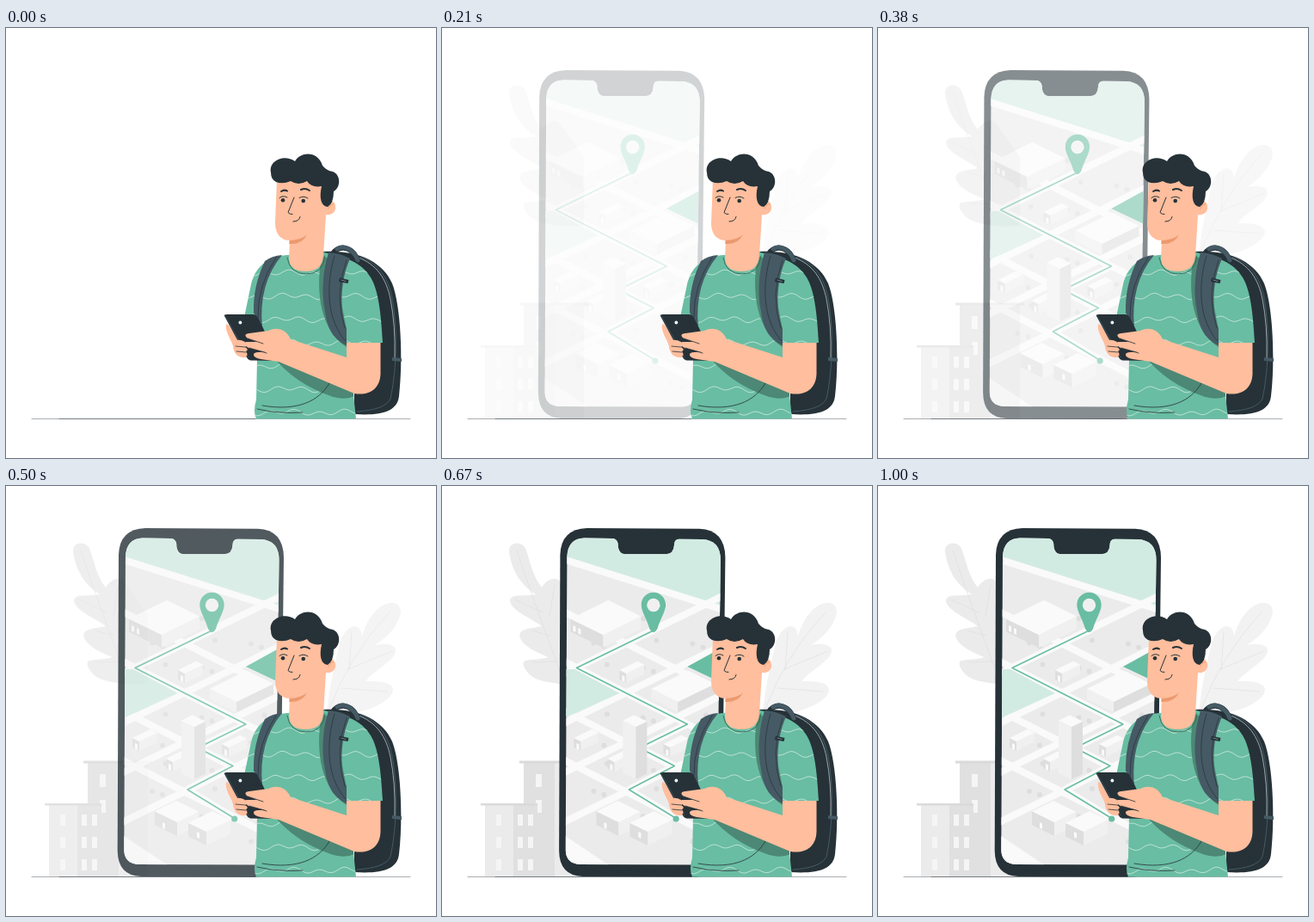
Animation, 500 px wide and 500 px high, one loop 1.04 s. Source, as an HTML page:

```html
<!DOCTYPE html>
<html lang="en">
<head>
<meta charset="utf-8">
<title>Traveller with map</title>
<style>
  html, body { margin: 0; width: 100%; height: 100%; overflow: hidden; background: #fff; }
  svg { display: block; width: 100vw; height: 100vh; }
  .line { fill: none; stroke-linecap: round; stroke-linejoin: round; }
  .ink { stroke: #263238; }
</style>
</head>
<body>
<svg viewBox="0 0 500 500">
  <defs>
    <clipPath id="screenClip">
      <path d="M165 60.500L198 61Q203 61.500 204.200 67Q204 79 213 79.300H260Q269 79 269.500 69Q269.500 62 275 61.700L302 62Q323.500 63 323.500 86L319 425Q318 440.500 302 440.500L160 440Q143.500 439 143.300 423L145 82Q146 61 165 60.500Z"/>
    </clipPath>
    <clipPath id="shirtClip"><use href="#shirt"/></clipPath>
  </defs>

  <g id="scenery" opacity="0">
    <path fill="#ebebeb" d="M78 77C77 64 94 63 98 75C103 90 106 106 116 118C122 108 133 104 138 112L165 150V230C142 232 122 229 109 224C97 218 91 205 97 203C104 201 117 202 123 199C112 194 95 187 91 177C87 165 104 166 116 163C104 154 81 145 79 134C79 124 97 129 109 126C91 114 82 100 78 77Z"/>
    <path class="line" stroke="#e0e0e0" stroke-width=".8" d="M87 75Q107 135 141 226M126 174L104 168M117 147L85 132M125 151L131 115M134 204L105 205"/>
    <path fill="#f2f2f2" d="M372 270C376 235 381 211 388 183C393 164 411 154 414 174C420 156 430 139 446 136C457 134 462 144 457 154C451 169 440 178 429 185C441 182 454 184 453 192C452 203 430 213 418 227C432 227 449 227 450 237C449 248 430 259 405 264Z"/>
    <path class="line" stroke="#e3e3e3" stroke-width=".8" d="M373 268Q397 199 446 147M399 214L402 169M398 213L449 192M390 235L443 239"/>
    <g id="buildings"></g>
  </g>

  <path class="line ink" stroke-width=".4" d="M30 454.500H470M62 454.500H290"/>

  <g id="phone" opacity="0">
    <path fill="#263238" d="M168 49L299 49.700Q328.500 51 329 83L325 425Q324 454.500 295 454.500L163 454Q136 453 135.700 424L137 80Q138 50 168 49Z"/>
    <g clip-path="url(#screenClip)">
      <path fill="#ebebeb" d="M140 55H330V445H140Z"/>
      <path fill="#d2ebe2" d="M140 55H330V141L140 81Z"/>
      <g id="trees" fill="#dedede"></g>
      <path id="roads" class="line" stroke="#fafafa" stroke-width="8"/>
      <path fill="#fafafa" d="M140 405L200 445H140Z"/>
      <path fill="#d2ebe2" d="M140 213H154L206 241L140 271Z"/>
      <path fill="#69bda2" d="M285 210L325 188V229Z"/>
      <path id="route" class="line" stroke="#69bda2" stroke-width="1.500" d="M245.500 168L156 211.500L285 277L229 304.500L270 325.500L217 353L271 386"/>
      <g id="blocks"></g>
      <circle cx="271.700" cy="387" r="3.600" fill="#69bda2"/>
      <path fill="#69bda2" d="M245.500 123.700C253.500 123.700 259.700 130 259.700 138C259.700 146 253.500 154 250 166Q245.500 174 241 166C237.500 154 231.300 146 231.300 138C231.300 130 237.500 123.700 245.500 123.700Z"/>
      <circle cx="245.500" cy="138.500" r="7.700" fill="#f0f0f0"/>
    </g>
  </g>

  <g id="backpack">
    <path fill="#263238" d="M369 260C410 258 438 272 449 297C459 322 462 385 457 428C455 446 437 451 405 449V400L380 290Z"/>
    <path class="line" stroke="#455a64" d="M412 266C435 274 446 293 450 320C456 360 453 404 447 431Q441 444 408 446"/>
    <path class="line" stroke="#cfd8dc" stroke-width=".7" d="M410 267C431 275 442 291 447 315Q453 345 452 384"/>
    <path class="line ink" stroke-width="6" d="M379 264C384 253 401 251 409 270"/>
    <path class="line" stroke="#455a64" stroke-width="5" d="M385 257C393 251 405 259 409 270"/>
    <path fill="#455a64" d="M449 383L460 384V388L449 387Z"/>
  </g>

  <path id="shirt" fill="#69bda2" d="M327 264C303 266 290 278 285 298L277.500 334L293 338L291 432Q287 446 291 454.500H407L403 416L398 366H438C436 330 433 305 424 290C414 273 395 266 370 261Z"/>
  <g clip-path="url(#shirtClip)">
    <path id="waves" class="line" stroke="#c3e5d9" stroke-width=".9"/>
    <path fill="#4c8875" d="M367 265C359 310 367 352 396 371V350L380 270ZM313 385L404 420L405 428Q393 434 375 427C350 418 329 404 313 385Z"/>
    <path class="line ink" stroke-width=".8" d="M298 439C339 446 364 434 376 413M292 443Q318 449 345 447"/>
  </g>
  <path class="line" stroke="#37705e" d="M327 267Q330 286 349 286Q369 286 371 265"/>
  <path fill="#455a64" d="M321 264Q309 265 301 271Q287 300 288 331L298 348Q293 298 321 264ZM375 261Q389 262 400 268C387 298 389 331 396 350V369C381 362 374 351 371 330C366 305 369 281 375 261Z"/>
  <path class="line ink" stroke-width=".7" d="M314 267Q292 300 293 337M382 265C371 302 374 341 395 364M396 270Q381 310 394 349"/>
  <path fill="#263238" d="M388 290.500L398.500 293L397.500 297L387 295Z"/>
  <path class="line" stroke="#90a4ae" stroke-width=".7" d="M390 293L395 294.500"/>

  <g id="head">
    <path fill="#ffbe9d" d="M315 176L313 227C313 240 320 247 330 247L329 268Q330 283 348 283Q368 283 369 265L372 217C380 218 384 213 383 207C382 200 376 200 373 206V176Z"/>
    <path fill="#eb996e" d="M329.500 247Q342 247 350 240.500Q344 252 329.300 251Z"/>
    <path fill="#263238" d="M308 168C305 154 324 146 336 155C343 143 363 143 368 160Q373 166 380 167C389 170 390 185 381 190Q381 204 374 208C366 207 364 197 367 184Q355 186 350 178Q340 184 331 178Q322 182 314 179Q308 176 308 168Z"/>
    <path class="line ink" stroke-width="2" d="M320 190Q323.500 187.500 327 189.500M343 188Q348 185.500 353 189"/>
    <path class="line ink" d="M318 197.500Q322 194 327 197M341 197.500Q346 194.500 351 198M335 197L328 214.500Q330 217 333 216.500M334 225Q341 225 342 219.500"/>
    <path class="line" stroke="#eb996e" stroke-width=".8" d="M375 210Q377 204 381 205"/>
    <g fill="#263238"><circle cx="322" cy="200.300" r="2.300"/><circle cx="345.700" cy="201" r="2.300"/></g>
  </g>

  <g id="hands">
    <path fill="#ffbe9d" d="M256 344C260 344 264 355 269 360L279 363C284 371 283 380 279 383C271 384 265 380 264 370C262 362 254 353 256 344Z"/>
    <path fill="#263238" d="M254 335Q253 333 257 333H287Q291 333 293 337L318 387L284 386.500Q281 386 280 383Z"/>
    <path class="line" stroke="#455a64" stroke-width=".7" d="M255 335L282 383"/>
    <circle cx="272.400" cy="342.500" r="1.900" fill="#fff"/>
    <path fill="#ffbe9d" d="M264 364Q271 361 278 365Q282 369 278 371Q283 374 279 376Q283 381 277 383Q267 382 264 371Z"/>
    <path fill="#ffbe9d" d="M396 366H435.500V402C435 420 422 428 405 425L317 388L296 385Q287 383 288 379Q290 376 302 377L282 372Q275 368 279 365L292 365L281 361Q275 356 283 355L305 352C316 347 326 351 331 362L396 383Z"/>
    <path class="line ink" stroke-width=".8" d="M281 361L299 367M283 372L303 378M267 370L278 371M268 376L279 377"/>
  </g>
</svg>
<script>
  const LOOP = 1040, FRAME = 1000 / 24, TRAVEL = 30;
  const byId = id => document.getElementById(id);
  const range = n => [...Array(n).keys()];
  const rect = (x, y, w, h, fill) => `<rect x="${x}" y="${y}" width="${w}" height="${h}" fill="${fill}"/>`;
  const poly = (fill, ...points) => `<path fill="${fill}" d="M${points.map(p => p.join(' ')).join('L')}Z"/>`;

  // Map streets: two families of evenly spaced parallels.
  const EDGE = 140, GAP = 57.5, FALL = 0.51, RISE = 0.49;
  const fallAt = k => 203 + GAP * k, riseAt = k => 219 + GAP * k;
  const crossing = (f, r) => {
    const dx = (riseAt(r) - fallAt(f)) / (FALL + RISE);
    return [EDGE + dx, fallAt(f) + FALL * dx];
  };
  const street = (y, slope) => `M${EDGE} ${y}l190 ${190 * slope}`;
  byId('roads').setAttribute('d', 'M140 85L330 145' + byId('route').getAttribute('d') +
    range(4).map(k => street(fallAt(k - 1), FALL) + street(riseAt(k), -RISE)).join(''));

  // Trees stand in the corners of every city block.
  byId('trees').innerHTML = range(30).map(i => {
    const [x, y] = crossing(i % 5 - 1.5, Math.floor(i / 5) - .5);
    return [-22, 20, 32].map((dx, j) =>
      `<circle cx="${x + dx}" cy="${y + (j - 1) * 4}" r="3"/>`).join('');
  }).join('');

  // Isometric block; (x, y) is the front corner of its roof.
  function block(x, y, left, right, height, darkLeft = true) {
    const l = [x - left, y - left * RISE], r = [x + right, y - right * RISE];
    const back = [x - left + right, y - (left + right) * RISE];
    const down = p => [p[0], p[1] + height];
    const front = [x, y];
    const shades = darkLeft ? ['#dedede', '#f0f0f0'] : ['#f0f0f0', '#dedede'];
    return poly(shades[0], l, front, down(front), down(l)) +
      poly(shades[1], front, r, down(r), down(front)) +
      poly('#fafafa', l, front, r, back);
  }
  const opening = (x, y) => poly('#fafafa', [x, y], [x + 3, y + 1.5], [x + 3, y + 8], [x, y + 6.5]);
  const house = (x, y) => block(x, y, 8, 21, 11) + opening(x - 5, y + 2);

  byId('blocks').innerHTML =
    block(187, 173, 38, 44, 15) + opening(152, 162) + opening(158, 165) +
    block(274, 251, 31, 43, 12, false) +
    house(214, 218) + house(161, 297) + house(200, 321) + house(265, 304) +
    block(205, 391, 26, 25, 16) + opening(188, 391) +
    block(239, 402, 21, 28, 16) + opening(228, 402) +
    block(225, 280, 15, 13, 61, false);

  const windows = x => range(3).map(i => rect(x, 382 + 26 * i, 6, 13, '#f5f5f5')).join('');
  byId('buildings').innerHTML =
    rect(95, 321, 36, 133, '#e0e0e0') + rect(131, 321, 34, 133, '#ebebeb') + rect(90, 319.5, 80, 3, '#dadada') +
    rect(109, 335, 7, 15, '#f5f5f5') + rect(109, 365, 7, 15, '#f5f5f5') +
    rect(50, 371, 33, 83, '#ebebeb') + rect(83, 371, 28, 83, '#e0e0e0') + rect(45, 369, 66, 2.5, '#dadada') +
    windows(63) + windows(88) + windows(100);

  const wave = y => 'M' + range(87).map(i => {
    const x = 270 + 2 * i;
    return `${x} ${(y + 2.4 * Math.sin(x / 4.6 + y) + 1.5 * Math.sin(x / 11)).toFixed(1)}`;
  }).join('L');
  byId('waves').setAttribute('d', range(7).map(k => wave(285 + 27 * k)).join(''));

  // Ease with a slight overshoot: cubic-bezier(.36, -.01, .5, 1.38).
  const bezier = (s, a, b) => 3 * (1 - s) ** 2 * s * a + 3 * (1 - s) * s * s * b + s ** 3;
  function ease(x) {
    let low = 0, high = 1;
    for (let i = 0; i < 24; i++) {
      const mid = (low + high) / 2;
      if (bezier(mid, .36, .5) < x) low = mid; else high = mid;
    }
    return bezier(low, -.01, 1.38);
  }

  function draw(ms) {
    const step = Math.floor((ms + 4) / FRAME);
    const amount = step < 3 ? 0 : ease(Math.min(1, step / 24 + .03));
    const opacity = Math.min(1, amount);
    byId('scenery').setAttribute('opacity', opacity);
    byId('phone').setAttribute('opacity', opacity);
    byId('phone').setAttribute('transform', `translate(${TRAVEL * (amount - 1)} 0)`);
  }

  const start = performance.now();
  function tick() {
    draw((performance.now() - start) % LOOP);
    requestAnimationFrame(tick);
  }
  tick();
</script>
</body>
</html>
```
